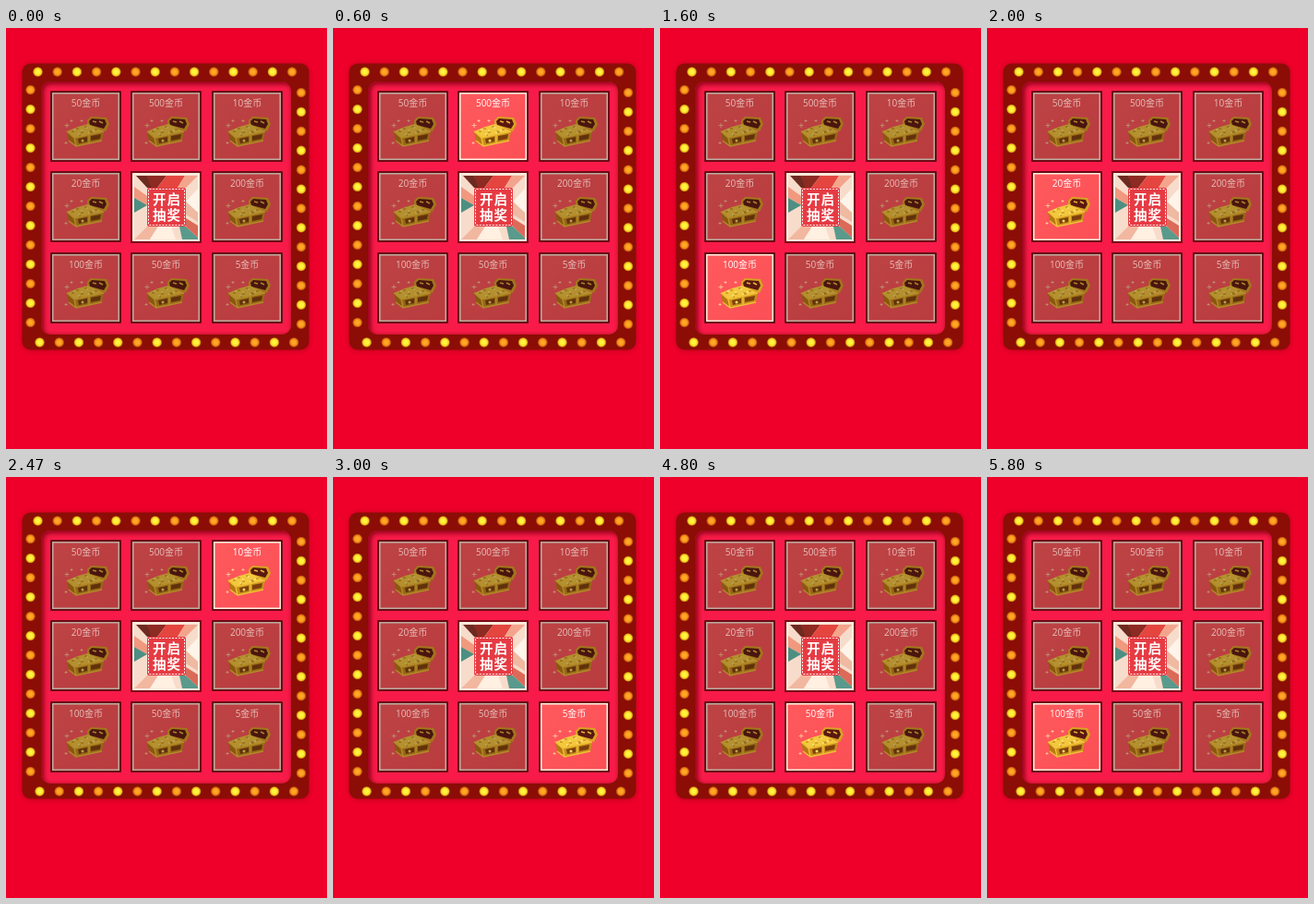
Recreate the animation shown at these times as an HTML page. Size 348 px wide and 456 px high, loop 5.87 s.

```html
<!DOCTYPE html>
<html lang="zh-CN">
<head>
<meta charset="utf-8">
<style>
  html, body { margin: 0; width: 100%; height: 100%; overflow: hidden; background: #ee002b; }
  svg { display: block; width: 348px; height: 456px; }
  text { font-family: "Open Sans", "Noto Sans CJK SC", "Noto Sans CJK", sans-serif; text-anchor: middle; fill: #fff; }
  .label { font-size: 10px; fill: #e6bfb9; }
  .button { font-size: 14.5px; font-weight: 900; letter-spacing: 1.2px; }
  .lit .label { fill: #fff; }
  .lit .shade { display: none; }
</style>
</head>
<body>
<svg viewBox="0 0 348 456">
  <defs>
    <radialGradient id="yellow">
      <stop offset=".45" stop-color="#fff23c"/><stop offset=".75" stop-color="#f0c01c"/>
      <stop offset="1" stop-color="#8b1a05"/>
    </radialGradient>
    <radialGradient id="orange">
      <stop offset=".4" stop-color="#ffa725"/><stop offset=".72" stop-color="#e87d14"/>
      <stop offset="1" stop-color="#8b1505"/>
    </radialGradient>
    <linearGradient id="face" x2="1" y2="1">
      <stop stop-color="#ff5a5d"/><stop offset="1" stop-color="#fb4f55"/>
    </linearGradient>
    <filter id="soft" x="-10%" y="-10%" width="120%" height="120%"><feGaussianBlur stdDeviation="2.5"/></filter>
    <clipPath id="well"><rect x="38" y="58" width="271" height="274" rx="10"/></clipPath>
    <g id="chest">
      <path d="M39 31l4-4 17 1 3 7-4 8-20-6z" fill="#d9a321"/>
      <path d="M41 32l3-3 14 1 2 5-3 5-15-4z" fill="#5a1810"/>
      <path d="M45 32l4 1m3-1l4 2" stroke="#e8b738" stroke-width="1.500"/>
      <path d="M17 43l12-5 11-3 17 8-3 5-29 3z" fill="#f3c83f"/>
      <path d="M17 43l8 7 2 9-8-6z" fill="#b77713"/>
      <path d="M25 50l32-7-2 10-28 6z" fill="#c98e1c"/>
      <path d="M29 51l10-2v5l-9 2zM43 48l11-2-1 5-10 2z" fill="#7d400b"/>
      <path d="M17 43l8 7 32-7M19 53l8 6 28-6M25 50l2 9M41 47v9" fill="none" stroke="#f0c035" stroke-width="1.400"/>
      <circle cx="34" cy="53" r="1.500" fill="#f9dc61"/>
      <path d="M22 43h3m2-3h3m2 4h3m1-6h3m2 5h3m3-2h3m-20 6h2m10-3h3" stroke="#b87c14"/>
      <path d="M24 41h2m6 1h2m4-3h2m5 3h2m-18 4h2m9-2h2" stroke="#fff4a0"/>
      <path d="M17 34v5m-2.500-2.500h5M22 30v3m-1.500-1.500h3M33 30v3m-1.500-1.500h3M16 54v3m-1.500-1.500h3" stroke="#ffe3a4" stroke-width=".7"/>
    </g>
  </defs>

  <rect width="348" height="456" fill="#ee002b"/>
  <rect x="17" y="38" width="312" height="312" rx="10" fill="#a80016" opacity=".6" filter="url(#soft)"/>
  <rect x="17.500" y="38.500" width="311" height="310" rx="9" fill="#8b0d05"/>
  <g clip-path="url(#well)">
    <rect x="38" y="58" width="271" height="274" fill="#f81a49"/>
    <rect x="38" y="58" width="275" height="278" rx="10" fill="none" stroke="#8b0018" stroke-width="6" filter="url(#soft)"/>
  </g>
  <g id="bulbs"></g>
  <g id="cells"></g>

  <g transform="translate(136 156)">
    <rect x="-1" y="-1" width="77" height="78" fill="#7a0a18"/>
    <rect x="1" y="1" width="73" height="74" fill="#fbeee0"/>
    <rect x="3" y="3" width="69" height="70" fill="#f8dccb"/>
    <path d="M5 4h12l7 13H17z" fill="#6d2a20"/>
    <path d="M17 4h21L28 17h-7z" fill="#8d2a22"/>
    <path d="M38 4h20l-8 13H28z" fill="#e4463f"/>
    <path d="M58 4h14L59 17h-9z" fill="#f3a48c"/>
    <path d="M3 16l14 10v10L3 28z" fill="#f0997f"/>
    <path d="M3 28l14 8-14 8z" fill="#4d8f83"/>
    <path d="M72 18v26L59 32z" fill="#fff4e9"/>
    <path d="M59 32l13 12v10L59 46z" fill="#efb9a2"/>
    <path d="M3 73l14-14h12l-9 14z" fill="#f2b79f"/>
    <path d="M20 73l9-14h14l5 14z" fill="#fff0e2"/>
    <path d="M52 59h7l13 12v2H55z" fill="#5a9a8c"/>
    <path d="M59 50l13 8v13L59 59z" fill="#dc6a58"/>
    <rect x="17" y="17" width="42" height="42" rx="2" fill="#e63b43"/>
    <rect x="18.500" y="18.500" width="39" height="39" rx="1" fill="none" stroke="#fff" stroke-dasharray="2 1.500"/>
    <text class="button" x="38.600" y="34.500">开启</text>
    <text class="button" x="38.600" y="51.500">抽奖</text>
  </g>
</svg>
<script>
const bulbs = [];
const addRow = (n, x, y, dx, dy, first) => {
  for (let k = 0; k < n; k++) {
    const fill = (k + first) % 2 ? 'orange' : 'yellow';
    bulbs.push(`<circle cx="${x + k * dx}" cy="${y + k * dy}" r="5.6" fill="url(#${fill})"/>`);
  }
};
addRow(14, 34.5, 47.5, 21.2, 0, 0);
addRow(13, 320, 70, 0, 20.9, 1);
addRow(14, 36.5, 340.5, 21.2, 0, 0);
addRow(13, 26.5, 67, 0, 21, 1);
document.getElementById('bulbs').innerHTML = bulbs.join('');

// Cells run clockwise from the top left.
const xs = [49, 136, 224], ys = [69, 156, 244];
const prizes = [
  [0, 0, 50], [1, 0, 500], [2, 0, 10], [2, 1, 200],
  [2, 2, 5], [1, 2, 50], [0, 2, 100], [0, 1, 20]
];
const cells = document.getElementById('cells');
cells.innerHTML = prizes.map(([col, row, coins]) => `
  <g transform="translate(${xs[col]} ${ys[row]})">
    <rect x="-1" y="-1" width="77" height="77" rx="1" fill="#6b0a14"/>
    <rect x="1" y="1" width="73" height="73" fill="#fff1e2"/>
    <rect x="2.5" y="2.5" width="70" height="70" fill="url(#face)"/>
    <use href="#chest"/>
    <rect class="shade" x="1" y="1" width="73" height="73" fill="#24100c" opacity=".3"/>
    <text class="label" x="37.5" y="16">${coins}金币</text>
  </g>`).join('');

// Moments of each hop: speed up, run at full pace, slow down, long last wait.
const START = 505, LAG = 2.5, CRUISE_END = 50, HOPS = 63;
const hops = [START];
for (let n = 1, wait = 100; n < HOPS; n++) {
  if (n < CRUISE_END) wait = Math.max(40, wait - 10);
  else if (n > CRUISE_END) wait += n === HOPS - 1 ? 110 : 20;
  hops.push(hops[n - 1] + wait + LAG);
}

const LOOP = 5870, STEP = 200 / 3;
const origin = performance.now();
function draw(now) {
  const t = Math.max(0, now - origin) % LOOP;
  const tick = Math.min(87, Math.floor((t + 3.4) / STEP)) * STEP;
  const count = hops.filter(h => h <= tick).length;
  const lit = count ? (count - 1) % 8 : -1;
  [...cells.children].forEach((cell, i) => cell.classList.toggle('lit', i === lit));
  requestAnimationFrame(draw);
}
draw(origin);
</script>
</body>
</html>
```
